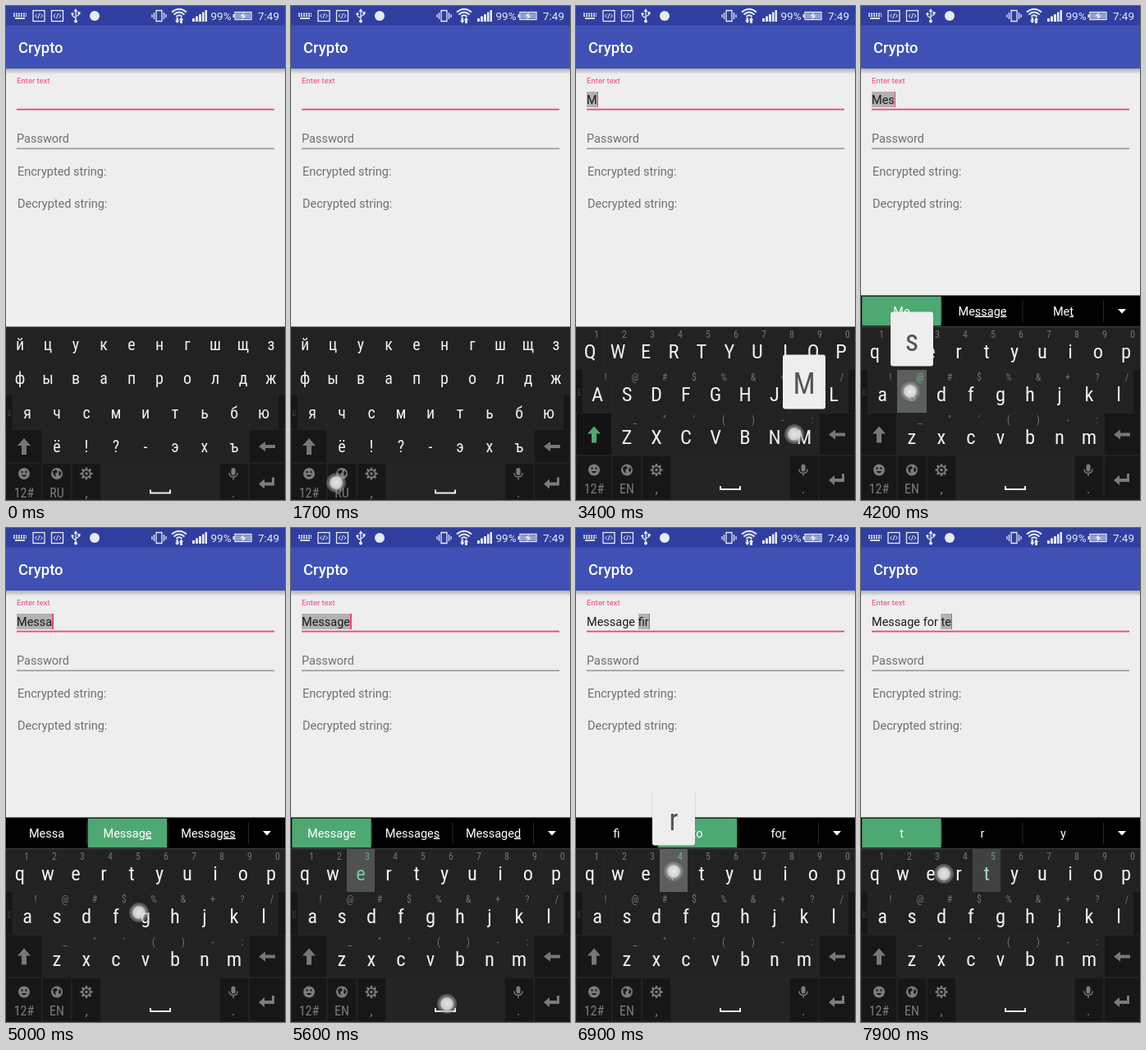
Write an HTML page that moves like this. It is 340 px wide and 600 px high and loops after 8000 ms.

```html
<!DOCTYPE html>
<html lang="en">
<head>
<meta charset="utf-8">
<title>Crypto</title>
<style>
  html, body { margin: 0; width: 100%; height: 100%; overflow: hidden; background: #eee; }
  body { position: relative; }
  svg { position: absolute; left: 0; top: 0; display: block; }
  svg, #input { font-family: Roboto, "Noto Sans", sans-serif; }
  .key { font-family: "Roboto Condensed", Roboto, sans-serif; font-stretch: condensed; text-anchor: middle; }
  .label { font-size: 14.5px; fill: #707070; }
  .mid { text-anchor: middle; }
  #input {
    position: absolute; left: 13px; top: 104px; height: 20px;
    font-size: 14.5px; line-height: 22px; color: #1c1c1c; white-space: pre;
  }
  mark { display: inline-block; height: 19px; vertical-align: top; background: #b2b2b2; color: inherit; }
  #input i { display: inline-block; width: 1.5px; height: 19px; vertical-align: top; background: #f2408a; }
</style>
</head>
<body>
<svg width="340" height="600" viewBox="0 0 340 600">
  <defs>
    <linearGradient id="shade" x2="0" y2="1">
      <stop stop-color="#000" stop-opacity=".26"/>
      <stop offset="1" stop-color="#000" stop-opacity="0"/>
    </linearGradient>
    <radialGradient id="touch">
      <stop stop-color="#f2f2f2" stop-opacity=".95"/>
      <stop offset=".55" stop-color="#dadada" stop-opacity=".92"/>
      <stop offset=".7" stop-color="#aaa" stop-opacity=".6"/>
      <stop offset=".92" stop-color="#888" stop-opacity=".45"/>
      <stop offset="1" stop-color="#888" stop-opacity="0"/>
    </radialGradient>
  </defs>

  <rect width="340" height="600" fill="#eee"/>
  <rect y="76" width="340" height="7" fill="url(#shade)"/>
  <rect y="23" width="340" height="53" fill="#3f51b5"/>
  <rect width="340" height="23.5" fill="#303f9f"/>

  <!-- status bar -->
  <g fill="none" stroke="#e8eaf6" stroke-width="1.3">
    <path d="M9 9.5H25M9 12.2H25" stroke-width="1.8" stroke-dasharray="2 1"/>
    <path d="M11 15H23" stroke-width="1.8"/>
    <g id="code">
      <rect x="33" y="5.5" width="14" height="13"/>
      <path d="M38 9.5L35.5 12L38 14.5M42 9.5L44.5 12L42 14.5M41 9L39 15" stroke-width="1"/>
    </g>
    <use href="#code" x="22.5"/>
    <path d="M85 5V18M85 15L81 12V9.5M85 13L89 10.5V8"/>
    <path d="M183 5.5H190V18.5H183ZM180.5 8V16M192.500 8V16M178 10V14M195 10V14"/>
    <path d="M202 7.5Q211 0 220 7.5M204.500 10.500Q211 4.500 217.500 10.500M207.500 13Q211 9.500 214.500 13" stroke-width="2"/>
    <rect x="279" y="7.5" width="20" height="9"/>
  </g>
  <g fill="#e8eaf6">
    <path d="M85 3L87.5 7H82.500Z"/>
    <circle cx="85" cy="18.5" r="2"/><circle cx="81" cy="9.5" r="1.6"/>
    <rect x="87.5" y="7" width="3" height="3"/>
    <circle cx="108" cy="12" r="6"/>
    <path d="M207.500 14H210V17.500H211.500L208.800 21L206 17.500H207.500ZM212 21V17H210.800L213.500 13.500L216.200 17H215V21Z"/>
    <path d="M227 15h3v4h-3zM231 12.5h3v6.5h-3zM235 10h3v9h-3zM239 7.5h2.5v11.5h-2.500zM242.500 5h2.500v14h-2.500z"/>
    <rect x="276.5" y="10" width="2" height="4"/>
    <path d="M280 8.500H298V15.500H280Z" opacity=".55"/>
    <path d="M290 8L285 12.500H288.500L287.500 16.500L293 11.500H289.500Z"/>
    <g font-size="13.5"><text x="249.5" y="17">99%</text><text x="307" y="17">7:49</text></g>
  </g>

  <!-- form -->
  <text x="15" y="57" font-size="18.5" font-weight="500" fill="#fff">Crypto</text>
  <text x="13" y="94" font-size="9.6" fill="#f2408a">Enter text</text>
  <rect x="13" y="124.7" width="314" height="1.8" fill="#f2408a"/>
  <text class="label" x="13" y="166">Password</text>
  <rect x="13" y="172.6" width="314" height="1.1" fill="#737373"/>
  <text class="label" x="14" y="206">Encrypted string:</text>
  <text class="label" x="14" y="245">Decrypted string:</text>

  <g id="boards"></g>
  <g id="live"></g>
</svg>
<div id="input"></div>

<script>
const LOOP = 8000, STEP = 100, GREEN = '#4ea872';
const RU = ['йцукенгшщз', 'фывапролдж', 'ячсмитьбю', 'ё!?-эхъ'];
const EN = ['qwertyuiop', 'asdfghjkl', 'zxcvbnm'];
const HINTS = ['1234567890', '!@#$%&+?/', '_"\'()-:'];
const EN_TOP = 390, EN_H = 52, EN_BASE = 38, EN_SIZE = 24.5;

// time, key, touch x, touch y
const taps = [
  [1600, 'lang', 55, 579], [3250, 'M', 266, 520], [3700, 'e', 88, 418],
  [4000, 's', 60, 468], [4280, 's', 61, 469], [4550, 'a', 26, 470],
  [4980, 'g', 162, 467], [5300, 'e', 90, 419], [5580, ' ', 190, 578],
  [6000, 'f', 137, 459], [6400, 'i', 253, 418], [6750, 'r', 119, 417],
  [7200, ' ', 188, 577], [7550, 't', 150, 418], [7850, 'e', 101, 420]
];
const LANG_AT = 1900, LOWER_AT = 3500;
const fixes = { fir: 'for' };

// highlighted cell, then three words; "_" starts the underlined part
const suggestions = {
  'M': [-1, 'M', 'M_y', 'M_e'],
  'Me': [0, 'Me', 'Me_ssage', 'Me_t'],
  'Mes': [1, 'Mes', 'Mes_sage', 'Mes_s'],
  'Mess': [0, 'Mess', 'Mess_age', 'Mess_ages'],
  'Messa': [1, 'Messa', 'Messa_ge', 'Messa_ges'],
  'Messag': [1, 'Messag', 'Messag_e', 'Messag_es'],
  'Message': [0, 'Message', 'Message_s', 'Message_d'],
  'Message ': [-1, '_me', '_with', '_you'],
  'f': [-1, 'f', 'f_or', 'f_rom'],
  'fi': [1, 'fi', 'to', 'fo_r'],
  'fir': [1, 'fir', 'for', 'fir_st'],
  'for ': [-1, '_the', '_me', '_you'],
  't': [0, 't', 'r', 'y']
};

const $ = id => document.getElementById(id);
const rect = (x, y, w, h, fill, more = '') =>
  `<rect x="${x}" y="${y}" width="${w}" height="${h}" fill="${fill}" ${more}/>`;
const esc = s => s.replace(/&/g, '&amp;').replace(/</g, '&lt;');
const letter = (ch, x, y, size, fill) =>
  `<text class="key" x="${x}" y="${y}" font-size="${size}" fill="${fill}">${esc(ch)}</text>`;
const keyBox = (x, y, w, h, fill = '#222') =>
  rect(x + .5, y + .5, w - 1, h - 1, fill, 'stroke="#2a2a2a" stroke-width=".6"');

function rowShape(n) {
  return n === 10 ? [0, 34] : n === 9 ? [8, 36] : [44, 36];
}

function icons(m, lang) {
  const at = (x, y, body) => `<g transform="translate(${x} ${y})">${body}</g>`;
  const y = m - 10.5, gray = '#7c7c7c', dark = '#1a1a1a';
  const teeth = [0, 45, 90, 135].map(a =>
    `<path d="M0-7.5V7.5" transform="rotate(${a})" stroke="${gray}" stroke-width="2.4"/>`).join('');
  return at(22, y, `<circle r="7" fill="${gray}"/><path d="M-3.5 1.5Q0 6 3.5 1.5Z" fill="${dark}"/>
      <circle cx="-2.5" cy="-2" r="1.2" fill="${dark}"/><circle cx="2.5" cy="-2" r="1.2" fill="${dark}"/>`)
    + at(62, y, `<circle r="7" fill="${gray}"/><path d="M-5-3L-1-5L1-2L-2 0L-1 4L-4 2ZM3-4L5.5-1L4 3L2 1Z" fill="${dark}"/>`)
    + at(98, y, `${teeth}<circle r="4.7" fill="${dark}" stroke="${gray}" stroke-width="1.7"/><circle r="1.8" fill="${gray}"/>`)
    + at(277, y, `<rect x="-2.5" y="-7" width="5" height="9" rx="2.5" fill="${gray}"/>
      <path d="M-5-1Q-5 4 0 4Q5 4 5-1M0 4V7.5" fill="none" stroke="${gray}" stroke-width="1.4"/>`)
    + at(318, m, `<path d="M-10 2L-3-4V0H6V-6H9V4H-3V8Z" fill="${gray}"/>`)
    + `<path d="M176 ${m + 9}v4h24v-4" fill="none" stroke="#eee" stroke-width="2"/>`
    + [['12#', 22], [lang, 62], [',', 98], ['.', 277]]
      .map(([s, x]) => letter(s, x, m + 18, 16, gray)).join('');
}

function board(id, rows, top, h, base, size, m, lang, hints, shiftOn) {
  const last = rows.length - 1, side = top + last * h, foot = top + rows.length * h;
  let out = rect(0, 389.5, 340, 210.5, '#171717');
  rows.forEach((row, r) => {
    const [x0, w] = rowShape(row.length), y = top + r * h;
    if (row.length === 9)
      out += `<text transform="translate(5.5 ${y + h / 2 + 5}) rotate(-90)" font-size="4.5" fill="#555">ETC</text>`;
    [...row].forEach((ch, i) => {
      const x = x0 + w * (i + .5);
      out += keyBox(x - w / 2, y, w, h) + letter(ch, x, y + base, size, '#f0f0f0');
      if (hints) out += letter(hints[r][i], x + (r ? 10 : 8), y + 13, 12, '#737373');
    });
  });
  const mid = side + h / 2 + .5;
  out += keyBox(0, side, 44, h, shiftOn ? '#131313' : '#171717') + keyBox(296, side, 44, h, '#171717')
    + `<path d="M22 ${mid - 10}l8 9h-5v11h-6v-11h-5Z" fill="${shiftOn ? GREEN : '#777'}"/>`
    + `<path d="M308 ${mid}l8-6v4h12v4h-12v4Z" fill="#777"/>`;
  [[0, 44], [44, 36], [80, 36], [116, 144], [260, 36], [296, 44]].forEach(([x, w]) =>
    out += keyBox(x, foot, w, 600 - foot, w === 144 ? '#242424' : '#171717'));
  return `<g id="${id}">${out}${icons(m, lang)}</g>`;
}

$('boards').innerHTML =
  board('ru', RU, 390, 41.3, 28, 20, 578.5, 'RU')
  + board('upper', EN.map(r => r.toUpperCase()), EN_TOP, EN_H, EN_BASE, EN_SIZE, 574, 'EN', HINTS, true)
  + board('lower', EN, EN_TOP, EN_H, EN_BASE, EN_SIZE, 574, 'EN', HINTS);

function findKey(ch) {
  const r = EN.findIndex(row => row.includes(ch.toLowerCase()));
  if (r < 0) return null;
  const i = EN[r].indexOf(ch.toLowerCase()), [x0, w] = rowShape(EN[r].length);
  return { x: x0 + w * (i + .5), y: EN_TOP + r * EN_H, w, r, hint: HINTS[r][i] };
}

// committed text, the word being composed, and the key for suggestions
function typed(now, lag) {
  let done = '', word = '', topic = '';
  for (const [at, ch] of taps) {
    if (ch === 'lang' || now < at + lag) continue;
    if (ch === ' ') {
      topic = (fixes[word] || word) + ' ';
      done += topic;
      word = '';
    } else topic = word += ch;
  }
  return { done, word, topic };
}

function bar(topic) {
  const [hot, ...words] = suggestions[topic];
  let out = rect(0, 351.5, 340, 38, '#000');
  words.forEach((s, i) => {
    const x = i * 98.5, [a, b = ''] = s.split('_');
    if (i === hot) out += rect(x + 1.2, 352.7, 96.5, 35.6, GREEN);
    out += rect(x + 98, 358, 1, 26, '#2a2a2a')
      + `<text class="mid" x="${x + 49.5}" y="375.5" font-size="14.5" fill="#fff">${a}<tspan text-decoration="underline">${b}</tspan></text>`;
  });
  return out + '<path d="M313 368H323L318 373.5Z" fill="#fff"/>';
}

function glow(k, ch, alpha) {
  return `<g opacity="${alpha}">` + rect(k.x - k.w / 2, k.y, k.w, EN_H, '#5c5f5d')
    + letter(ch, k.x, k.y + EN_BASE, EN_SIZE, '#62bd88')
    + letter(k.hint, k.x + (k.r ? 10 : 8), k.y + 13, 12, '#62bd88') + '</g>';
}

function popup(k, ch) {
  const x = k.x - 26, y = k.y - 70.5;
  return rect(x - .5, y + .5, 53, 66.5, '#000', 'rx="3" opacity=".14"')
    + rect(x, y, 52, 66, '#eee', 'rx="3"')
    + letter(ch, k.x, y + 47, 36, '#555');
}

function draw(now) {
  const shown = now < LANG_AT ? 'ru' : now < LOWER_AT ? 'upper' : 'lower';
  for (const id of ['ru', 'upper', 'lower']) $(id).style.display = id === shown ? '' : 'none';

  const { done, word } = typed(now, 30), { topic } = typed(now, 250);
  const blink = now % 1000 >= 200 && now % 1000 < 700;
  const cursor = done || word || blink ? '<i></i>' : '';
  $('input').innerHTML = done + (word && `<mark>${word}</mark>`) + cursor;

  let keys = '', pops = '', dots = '';
  for (const [at, ch, x, y] of taps) {
    const age = now - at, k = findKey(ch);
    if (age < 0 || age > 450) continue;
    if (ch.length === 1 && age >= 80) {
      const alpha = Math.min(1, (450 - age) / 190);
      if (k && ch !== 'M') keys += glow(k, ch, alpha);
      if (ch === ' ') keys += rect(116, 546, 144, 54, '#888', `opacity="${alpha * .45}"`);
      if (k && age < 260) pops += popup(k, ch);
    }
    if (age < 260) dots += `<circle cx="${x}" cy="${y}" r="12.5" fill="url(#touch)"/>`;
  }
  $('live').innerHTML = keys + (topic ? bar(topic) : '') + pops + dots;
}

let start, last = -1;
function tick(t) {
  start ??= t;
  const now = Math.floor((t - start) % LOOP / STEP) * STEP;
  if (now !== last) draw(last = now);
  requestAnimationFrame(tick);
}
draw(0);
requestAnimationFrame(tick);
</script>
</body>
</html>
```
